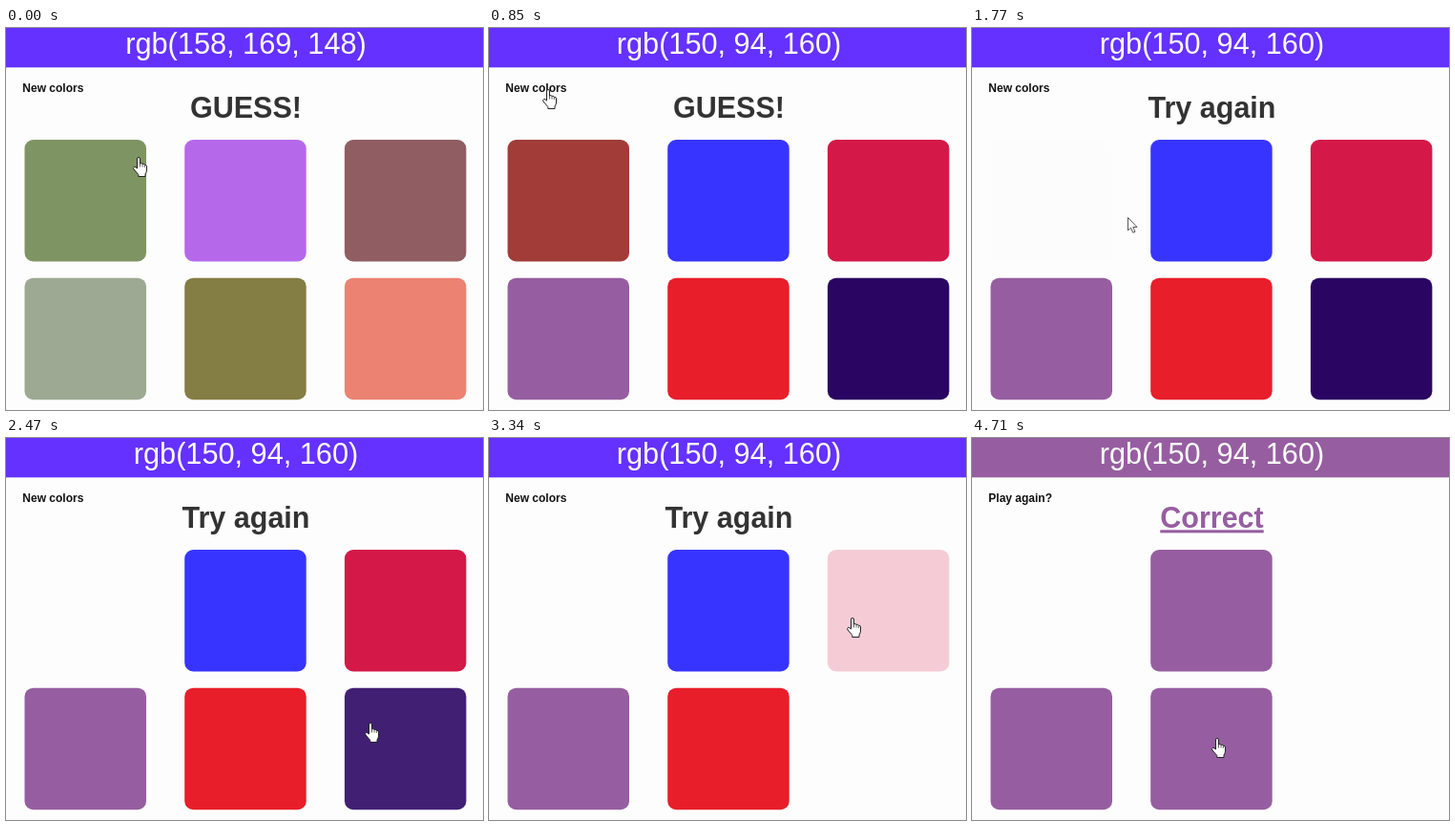
Write an HTML page that moves like this. It is 500 by 400 pixels and loops after 4.79 s.

```html
<!DOCTYPE html>
<html lang="en">
<head>
<meta charset="utf-8">
<title>Colour guessing game</title>
<style>
  html, body { margin: 0; width: 100%; height: 100%; overflow: hidden; background: #fdfdfd; }
  svg { display: block; width: 500px; height: 400px; }
  text { font-family: "Liberation Sans", Arial, sans-serif; }
  #code { font-size: 30.7px; fill: #fff; text-anchor: middle; }
  #button { font-size: 12px; font-weight: bold; fill: #111; }
  #message { font-size: 30.5px; font-weight: bold; text-anchor: middle; }
  .won { text-decoration: underline; }
  #hand, #arrow { fill: #fff; stroke: #222; stroke-linejoin: round; }
  #arrow { stroke: #555; }
</style>
</head>
<body>
<svg viewBox="0 0 500 400">
  <rect width="500" height="400" fill="#fdfdfd"/>
  <rect id="header" width="500" height="41.3"/>
  <text id="code" x="251.5" y="27"></text>
  <text id="button" x="17.3" y="67"></text>
  <text id="message" x="251.5" y="94.3"></text>
  <g id="cards"></g>
  <g id="hand">
    <path d="M4.5 12V2Q4.5 .5 6 .5T7.5 2V7Q9 6 10 7.3Q11.6 6.8 12.3 8.2Q14.5 8 14.5 10V14Q14.5 16 13 18V20.5H5.8V18.5L1 13Q0 11 1.5 10.4Q3 10.3 4.5 12Z"/>
    <path d="M7.5 7V10.5M10 7.5V10.5M12.3 8.2V11" fill="none" stroke-width=".7"/>
  </g>
  <path id="arrow" d="M.5 .5V14L3.5 11.2L5.8 16.3L8 15.3L5.8 10.5H10Z"/>
</svg>
<script>
const LOOP = 4790, STEP = 76, SIZE = 127.5;
const NEW_ROUND = 700, FIRST_MISS = 1540, WIN = 3940, FADE = 300;
const PICKED = "#965ea0";

const palettes = [
  ["#7e9462", "#b569ea", "#8f5d62", "#9da992", "#847d44", "#ec8272"],
  ["#a23c38", "#3834ff", "#d41847", PICKED, "#e81e2a", "#2a0562"]
];
const fadeStart = { 0: 1490, 2: 3195, 5: 2437 };

// pointer moves: start, steps, x, y
const origin = [138, 135];
const moves = [
  [70, 7, 61, 64],
  [930, 4, 103, 130],
  [1230, 3, 108, 149],
  [1540, 4, 163, 198],
  [1850, 3, 349, 283],
  [2080, 3, 381, 301],
  [2400, 1, 381, 298],
  [2470, 1, 381, 298],
  [2550, 5, 399, 167],
  [2930, 3, 411, 149],
  [3250, 1, 390, 172],
  [3340, 1, 380, 188],
  [3410, 4, 87, 330],
  [3710, 1, 90, 323],
  [3790, 1, 79, 317],
  [3940, 1, 87, 330],
  [4020, 5, 199, 306],
  [4630, 2, 256, 314]
];

const byId = id => document.getElementById(id);
const [header, code, button, message, hand, arrow] =
  ["header", "code", "button", "message", "hand", "arrow"].map(byId);

const cards = palettes[0].map((_, i) => {
  const el = document.createElementNS("http://www.w3.org/2000/svg", "rect");
  const x = 19.5 + (i % 3) * 167.7, y = i < 3 ? 117 : 261.7;
  const attrs = { x, y, width: SIZE, height: SIZE, rx: 9 };
  for (const key in attrs) el.setAttribute(key, attrs[key]);
  byId("cards").append(el);
  return { el, x, y };
});

// cubic-bezier(.25, .1, .25, 1)
function ease(p) {
  if (p <= 0) return 0;
  if (p >= 1) return 1;
  const curve = (a, b, u) => 3 * a * u * (1 - u) ** 2 + 3 * b * u * u * (1 - u) + u ** 3;
  let lo = 0, hi = 1;
  for (let i = 0; i < 20; i++) {
    const mid = (lo + hi) / 2;
    if (curve(.25, .25, mid) < p) lo = mid; else hi = mid;
  }
  return curve(.1, 1, lo);
}

function pointerAt(t) {
  let from = origin, pos = origin, tick = t;
  for (const [start, steps, x, y] of moves) {
    if (t < start) break;
    const i = Math.min(steps - 1, Math.floor((t - start) / STEP));
    const p = (i + 1) / steps;
    pos = [from[0] + (x - from[0]) * p, from[1] + (y - from[1]) * p];
    tick = start + i * STEP;
    from = [x, y];
  }
  return { x: pos[0], y: pos[1], tick };
}

const inside = (p, x, y, w, h) => p.x >= x && p.x <= x + w && p.y >= y && p.y <= y + h;

function setText(el, value) {
  if (el.textContent !== value) el.textContent = value;
}

function render(t) {
  const p = pointerAt(t);
  const fresh = t >= NEW_ROUND, won = t >= WIN;

  header.setAttribute("fill", won ? PICKED : "#6431ff");
  setText(code, fresh ? "rgb(150, 94, 160)" : "rgb(158, 169, 148)");
  setText(button, won ? "Play again?" : "New colors");
  setText(message, won ? "Correct" : t >= FIRST_MISS ? "Try again" : "GUESS!");
  message.setAttribute("fill", won ? PICKED : "#333");
  message.setAttribute("class", won ? "won" : "");

  cards.forEach(({ el }, i) => {
    el.setAttribute("fill", won ? PICKED : palettes[+fresh][i]);
    el.setAttribute("opacity", i in fadeStart ? 1 - ease((p.tick - fadeStart[i]) / FADE) : 1);
  });

  const pointing = inside(p, 17, 56, 66, 14) ||
    cards.some(c => inside(p, c.x, c.y, SIZE, SIZE));
  hand.setAttribute("visibility", pointing ? "visible" : "hidden");
  arrow.setAttribute("visibility", pointing ? "hidden" : "visible");
  hand.setAttribute("transform", `translate(${p.x - 5} ${p.y})`);
  arrow.setAttribute("transform", `translate(${p.x} ${p.y})`);
}

const began = performance.now();
function loop() {
  render((performance.now() - began) % LOOP);
  requestAnimationFrame(loop);
}
loop();
</script>
</body>
</html>
```
